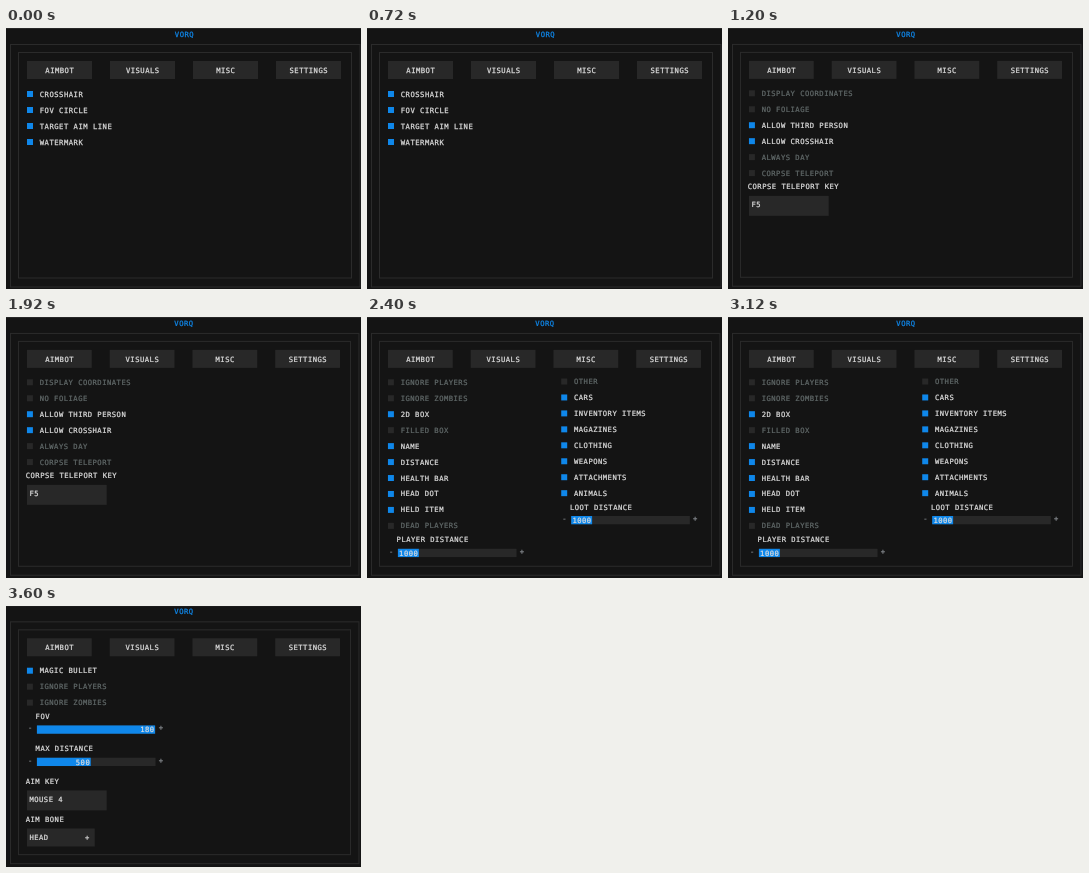
Animation, 355 px wide and 261 px high, one loop 4800 ms. Source, as an HTML page:

```html
<!DOCTYPE html>
<html lang="en">
<head>
<meta charset="utf-8">
<title>Menu tabs</title>
<style>
  html, body { margin: 0; height: 100%; overflow: hidden; background: #141414; }
  svg { display: block; width: 355px; height: 261px; color: #dcdcdc; }
  text {
    font: 7.2px "DejaVu Sans Mono", monospace;
    letter-spacing: .5px;
    fill: currentColor;
    stroke: currentColor;
    stroke-width: .25px;
  }
  rect { fill: currentColor; }
  .frame { fill: none; stroke: #2b2b2b; }
  .box { color: #282828; }
  .on { color: #0f87ea; }
  .off { color: #606868; }
  .sign { color: #8a8f94; }
</style>
</head>
<body>
<svg id="stage" viewBox="0 0 355 261"></svg>
<script>
const PAGE_MS = 1200;

const rect = (x, y, w, h, cls = 'box') =>
  `<rect x="${x}" y="${y}" width="${w}" height="${h}" class="${cls}"/>`;

// y is the vertical middle of the capitals
const text = (x, y, s, cls = '', anchor = 'start') =>
  `<text x="${x}" y="${y + 2.5}" class="${cls}" text-anchor="${anchor}">${s}</text>`;

// A leading "-" marks an unticked option
const checks = (x, y, names) => names.split(',').map((name, i) => {
  const off = name[0] === '-';
  const cy = y + i * 16;
  return rect(x, cy - 3, 6, 6, off ? 'box' : 'on') +
    text(x + 12.8, cy, off ? name.slice(1) : name, off ? 'off' : '');
}).join('');

const slider = (x, y, label, fill, value) =>
  text(x - 1.3, y - 9, label) +
  rect(x, y, 119, 8.3) + rect(x, y, fill, 8.3, 'on') +
  text(x + fill - 0.5, y + 4.5, value, '', 'end') +
  text(x - 9, y + 2.3, '-', 'sign') + text(x + 122.3, y + 2.3, '+', 'sign');

const field = (y, label, value, w = 80, h = 20) =>
  text(19.8, y - 9, label) + rect(21, y, w, h) + text(23.5, y + 9, value);

const shell =
  rect(0, 0, 356, 1) +
  rect(4.5, 16.5, 349.5, 242.5, 'frame') +
  rect(12.5, 24.5, 333, 225.5, 'frame') +
  text(178.5, 6.5, 'VORQ', 'on', 'middle') +
  ['AIMBOT', 'VISUALS', 'MISC', 'SETTINGS'].map((name, i) =>
    rect(21 + i * 83, 33, 65, 18) +
    text(53.8 + i * 83, 42.5, name, '', 'middle')).join('');

// The window sits a little differently on each page
const page = (dy, scale, content) =>
  `<g class="page" transform="translate(0 ${dy}) scale(${scale})">${shell}${content}</g>`;

const pages = [
  page(0, 1,
    checks(21, 66, 'CROSSHAIR,FOV CIRCLE,TARGET AIM LINE,WATERMARK')),

  page(0, 0.997,
    checks(21, 65.5, '-DISPLAY COORDINATES,-NO FOLIAGE,ALLOW THIRD PERSON,' +
      'ALLOW CROSSHAIR,-ALWAYS DAY,-CORPSE TELEPORT') +
    field(168.4, 'CORPSE TELEPORT KEY', 'F5')),

  page(0, 0.997,
    checks(21, 65.5, '-IGNORE PLAYERS,-IGNORE ZOMBIES,2D BOX,-FILLED BOX,NAME,' +
      'DISTANCE,HEALTH BAR,HEAD DOT,HELD ITEM,-DEAD PLAYERS') +
    slider(31, 232.5, 'PLAYER DISTANCE', 21, '1000') +
    checks(194.8, 64.7, '-OTHER,CARS,INVENTORY ITEMS,MAGAZINES,CLOTHING,WEAPONS,' +
      'ATTACHMENTS,ANIMALS') +
    slider(204.8, 199.6, 'LOOT DISTANCE', 21, '1000')),

  page(-0.6, 0.997,
    checks(21, 65.5, 'MAGIC BULLET,-IGNORE PLAYERS,-IGNORE ZOMBIES') +
    slider(31, 120.4, 'FOV', 118.5, '180') +
    slider(31, 152.8, 'MAX DISTANCE', 54, '500') +
    field(185.6, 'AIM KEY', 'MOUSE 4') +
    field(223.8, 'AIM BONE', 'HEAD', 68, 18) + text(79.2, 232.8, '+'))
];

const stage = document.getElementById('stage');
stage.innerHTML = pages.join('');
const groups = [...stage.querySelectorAll('.page')];

const start = performance.now();
function draw(now) {
  const t = Math.max(0, now - start);
  const current = Math.floor(t / PAGE_MS) % pages.length;
  groups.forEach((g, i) => g.style.display = i === current ? '' : 'none');
  requestAnimationFrame(draw);
}
draw(start);
</script>
</body>
</html>
```
